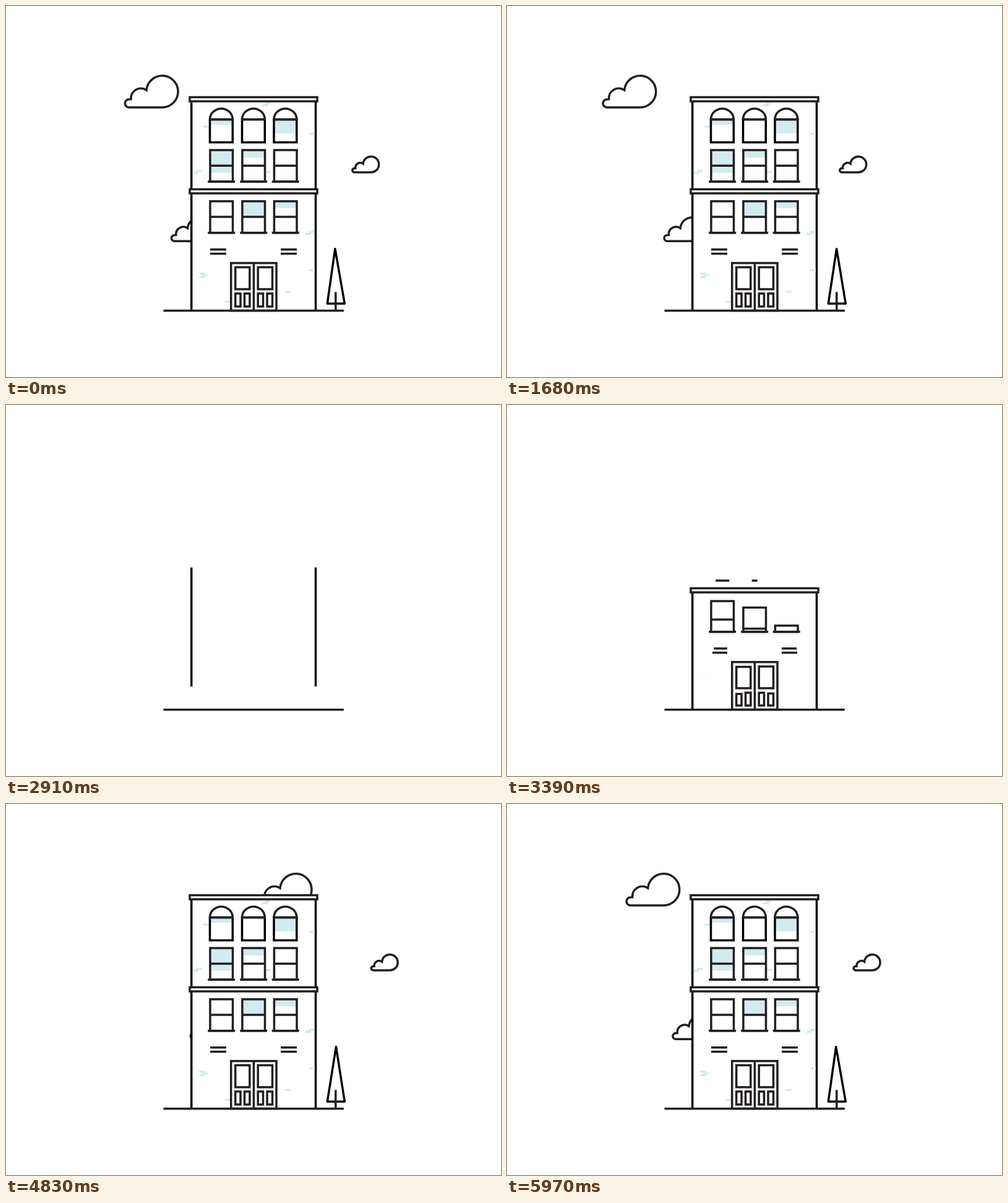
Animation, 800 px wide and 600 px high, one loop 6 s. Source, as an HTML page with a canvas:

```html
<!DOCTYPE html>
<html>
<head>
<meta charset="utf-8">
<title>Building</title>
<style>
html, body { margin: 0; width: 100%; height: 100%; overflow: hidden; background: #fff; }
canvas { display: block; }
</style>
</head>
<body>
<canvas id="stage" width="800" height="600"></canvas>
<script>
const ctx = document.getElementById('stage').getContext('2d');
const INK = '#231f20', BLACK = '#000', BLUE = '#d2ebf0';
const LOOP = 6000, CUT = 2550;
const COLUMNS = [348.2, 400.2, 451.7];
const cloudPath = new Path2D(
  'M6.5 0A6.5 6.5 0 0 1 6.5 -13L9.7 -13.3A16 16 0 0 1 34.7 -28A25.6 25.6 0 1 1 59.7 0Z');

let now = 0; // build time: 2550 (empty stage) to 8550

const lerp = (a, b, p) => a + (b - a) * p;
const easeOut = p => 1 - (1 - p) ** 3;
const linear = (start, length) => Math.min(1, Math.max(0, (now - start) / length));
const progress = (start, length) => easeOut(linear(start, length));

// Cubic Bezier easing with control points (x1, 0) and (x2, 1)
function bezier(s, x1, x2) {
  let lo = 0, hi = 1;
  for (let i = 0; i < 24; i++) {
    const u = (lo + hi) / 2, v = 1 - u;
    if (3 * u * v * v * x1 + 3 * u * u * v * x2 + u ** 3 < s) lo = u; else hi = u;
  }
  return lo * lo * (3 - 2 * lo);
}

function line(x1, y1, x2, y2, color = INK) {
  ctx.strokeStyle = color;
  ctx.beginPath();
  ctx.moveTo(x1, y1);
  ctx.lineTo(x2, y2);
  ctx.stroke();
}

function box(x1, y1, x2, y2, color = INK) {
  ctx.strokeStyle = color;
  ctx.strokeRect(x1, y1, x2 - x1, y2 - y1);
}

function fill(x1, y1, x2, y2, color = BLUE) {
  ctx.fillStyle = color;
  ctx.fillRect(x1, y1, x2 - x1, y2 - y1);
}

function cloud(x, y, scale) {
  ctx.save();
  ctx.translate(x, y);
  ctx.scale(scale, scale);
  ctx.lineWidth = 3.5 / scale;
  ctx.strokeStyle = INK;
  ctx.stroke(cloudPath);
  ctx.restore();
}

function clouds() {
  const t = now - LOOP;
  if (now > 4000) {
    const left = 640 * (1 - bezier(linear(4000, 2000), 0.3, 0.18));
    cloud(192.3 - 0.0222 * t + left, 164, 1);
  }
  if (now > 3780) {
    const left = (0.0034 * Math.max(0, 5559 - now)) ** 3;
    cloud(559.8 - 0.0131 * t + left, 269, 0.5);
  }
  if (now > 4300) cloud(250 + 17.5 * Math.exp(-t / 1150), 380.3, 0.75);
}

function walls(top, bottom, start, length, height) {
  if (now < start) return;
  const dy = -height * (1 - progress(start, length));
  fill(299.7, top + dy, 500.5, bottom + dy, '#fff');
  for (const x of [299.7, 500.5]) line(x, top + dy, x, bottom + dy, BLACK);
}

function cornice(y, start, length, height) {
  if (now < start) return;
  const dy = -height * (1 - progress(start, length));
  fill(297, y + dy, 503, y + 6.6 + dy, '#fff');
  box(297, y + dy, 503, y + 6.6 + dy);
}

// A pane rising from its ledge, or sinking from its top edge to its final place
function shade(x, top, bottom, from, start) {
  const p = progress(start, 260);
  if (p > 0) fill(x - 17, lerp(from, top, p), x + 17, lerp(from, bottom, p));
}

function sashRow(sill, start) {
  COLUMNS.forEach((x, i) => {
    const begin = start + i * 95;
    const width = 22 * progress(start - 60 + i * 20, 150);
    if (width > 0) line(x - width, sill, x + width, sill);
    const rise = 51 * progress(begin, 300);
    const mid = 25.8 * progress(begin + 95, 300);
    if (rise > 0) box(x - 18.3, sill - rise, x + 18.3, sill);
    if (mid > 0) line(x - 18.3, sill - mid, x + 18.3, sill - mid);
  });
}

function archRow() {
  const lids = [3850, 4050, 3950];
  COLUMNS.forEach((x, i) => {
    x -= 0.3;
    const rise = 37 * progress(3640 + i * 80, 260);
    if (rise > 0) box(x - 18.4, 220.5 - rise, x + 18.4, 220.5, BLACK);
    if (now < lids[i]) return;
    const rest = 1 - progress(lids[i], 250);
    ctx.save();
    ctx.translate(x, 183.5 - 50 * rest);
    ctx.rotate(-0.6 * rest);
    ctx.strokeStyle = INK;
    ctx.beginPath();
    ctx.ellipse(0, 0, 18.4, 17.6, 0, Math.PI, 2 * Math.PI);
    ctx.closePath();
    ctx.stroke();
    ctx.restore();
  });
}

function shades() {
  const [a, b, c] = COLUMNS;
  shade(b, 317, 340, 340, 3540);
  shade(c, 317, 327, 340, 3600);
  shade(a, 234, 257, 257, 3800);
  shade(a, 259, 269.5, 282, 3850);
  shade(b, 234, 245, 257, 3900);
  shade(a, 184, 192, 213, 3940);
  shade(c, 184, 206, 213, 4160);
}

// Each group: start time, then left edge and top of every brick
const BRICKS = [
  [3380, 312, 431, 317, 434, 312, 437],
  [3440, 489, 363.8, 484, 367],
  [3500, 490, 426],
  [3560, 450.5, 460.7],
  [3620, 353.5, 476.7],
  [4430, 418, 155.8, 414, 159],
  [4470, 319, 193.7],
  [4510, 489.5, 205],
  [4550, 307, 265, 302, 268],
  [4590, 418.5, 266.7]
];

function bricks() {
  for (const [start, ...spots] of BRICKS) {
    ctx.globalAlpha = linear(start, 180);
    for (let i = 0; i < spots.length; i += 2)
      fill(spots[i], spots[i + 1], spots[i] + 9.3, spots[i + 1] + 3.2);
  }
  ctx.globalAlpha = 1;
}

function panel(x1, x2, top, bottom, start) {
  const p = progress(start, 260);
  if (p > 0) box(x1, lerp(bottom, top, p), x2, bottom);
}

function door() {
  const rise = 76.8 * progress(2920, 220);
  if (rise > 0) {
    box(363.7, 492.5 - rise, 437, 492.5);
    line(400.4, 492.5 - rise, 400.4, 492.5);
  }
  panel(370.7, 393.8, 422.5, 458, 3210);
  panel(407.2, 430.5, 422.5, 458, 3190);
  [[370.7, 379], [385.5, 393.9], [407.2, 415.5], [422, 430.5]].forEach(([x1, x2], i) =>
    panel(x1, x2, 465, 486, [3255, 3190, 3200, 3240][i]));
}

function vents() {
  [393.8, 400.6].forEach((y, i) => {
    const left = 26 * progress(3240 - i * 40, 330);
    const right = 26 * progress(3200 - i * 30, 330);
    if (left > 0) line(356, y, 356 - left, y);
    if (right > 0) line(444, y, 444 + right, y);
  });
}

// Sway of the tree top: time, position
const SWAY = [[3840, 530], [4200, 537.5], [5350, 530.5], [6900, 534.1], [8550, 531]];

function tree() {
  const grow = progress(3840, 300);
  if (!grow) return;
  const i = Math.max(1, SWAY.findIndex(key => key[0] >= now));
  const [t0, x0] = SWAY[i - 1], [t1, x1] = SWAY[i];
  const tip = lerp(x0, x1, (1 - Math.cos(Math.PI * (now - t0) / (t1 - t0))) / 2);
  ctx.strokeStyle = BLACK;
  ctx.lineJoin = 'round';
  ctx.beginPath();
  ctx.moveTo(lerp(533, tip, grow), lerp(491, 392.7, grow));
  ctx.lineTo(533 + 14.3 * grow, lerp(491, 481.3, grow));
  ctx.lineTo(533 - 13.7 * grow, lerp(491, 481.3, grow));
  ctx.closePath();
  ctx.stroke();
  ctx.lineJoin = 'miter';
  line(532.8, 491, 532.8, lerp(491, 462.5, grow), INK);
}

function draw(time) {
  now = time % LOOP;
  if (now < CUT) now += LOOP;
  ctx.fillStyle = '#fff';
  ctx.fillRect(0, 0, 800, 600);
  ctx.lineWidth = 3.5;

  clouds();
  walls(300, 492.5, 2720, 330, 500);
  walls(150, 297, 4170, 300, 390);
  bricks();
  cornice(296.4, 3150, 230, 340);
  cornice(147.5, 4230, 240, 200);
  shades();
  sashRow(366.8, 3180);
  sashRow(284, 3420);
  archRow();
  vents();
  door();
  tree();
  const half = 145.7 * progress(CUT, 330);
  if (half > 0) line(400.2 - half, 492.7, 400.2 + half, 492.7);
}

const begin = performance.now();
function frame() {
  draw(performance.now() - begin);
  requestAnimationFrame(frame);
}
frame();
</script>
</body>
</html>
```
